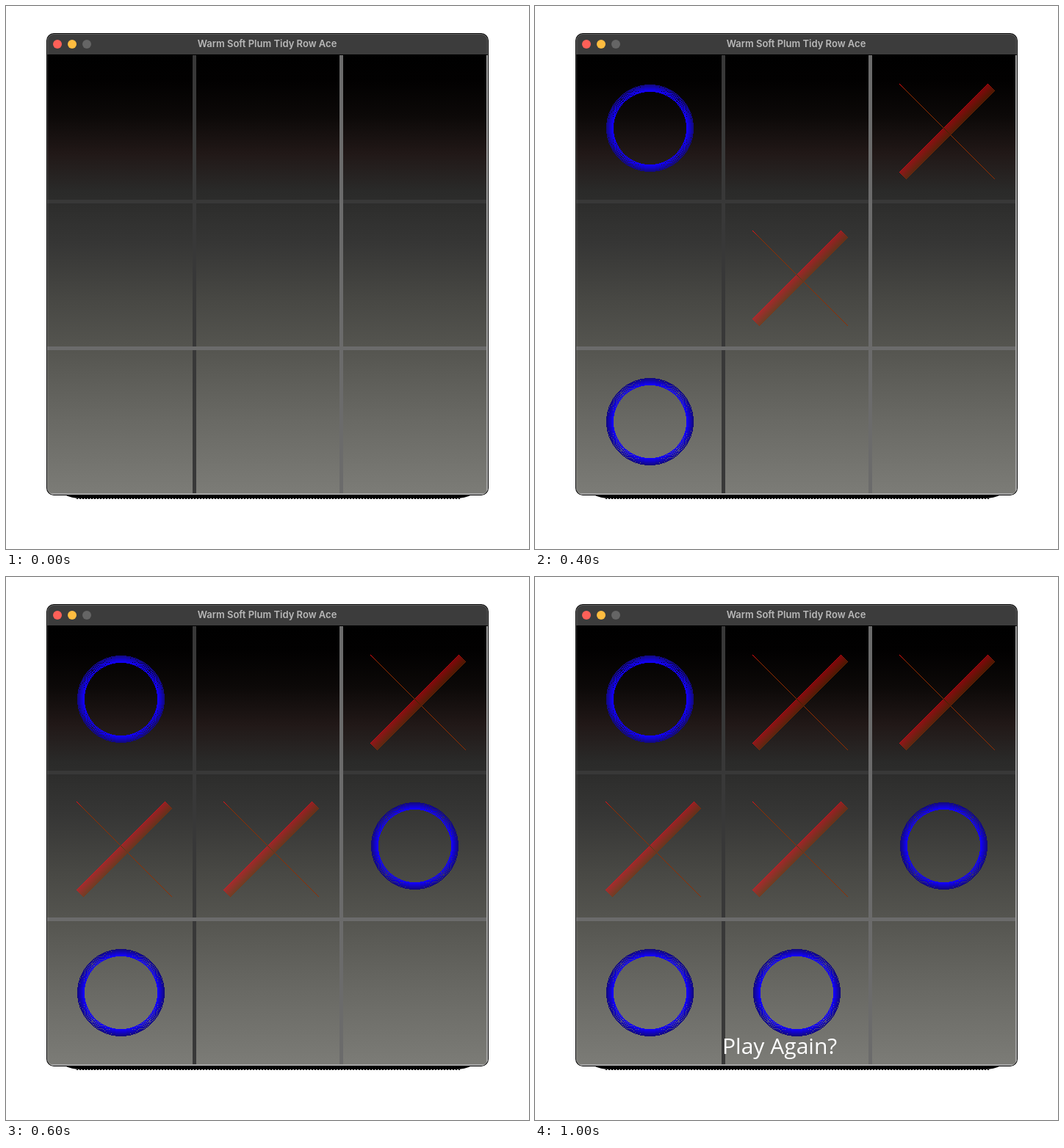
Animation of 712 by 740 pixels, one loop 1.2 s. Source, as an HTML page with a canvas:

```html
<!DOCTYPE html>
<html>
<head>
<meta charset="utf-8">
<style>
html, body { margin: 0; width: 100%; height: 100%; overflow: hidden; background: #fff; }
canvas { display: block; }
</style>
</head>
<body>
<canvas id="stage" width="712" height="740"></canvas>
<script>
const ctx = document.getElementById('stage').getContext('2d');
const LEFT = 56, TOP = 66, CELL = 200, STEP = 200, STEPS = 6;

// [step of appearance, mark, column, row]
const moves = [
  [1, 'O', 0, 0], [1, 'X', 1, 1],
  [2, 'X', 2, 0], [2, 'O', 0, 2],
  [3, 'X', 0, 1], [3, 'O', 2, 1],
  [4, 'X', 1, 0], [4, 'O', 1, 2]
];

const sky = ctx.createLinearGradient(0, TOP, 0, TOP + 600);
[[0, '#000'], [.06, '#020101'], [.14, '#0c0908'], [.225, '#211817'], [.31, '#2a2a29'],
 [.43, '#363635'], [.56, '#484844'], [.67, '#555550'], [.83, '#696964'], [1, '#7c7c77']]
  .forEach(([at, color]) => sky.addColorStop(at, color));

function roundRect(x, y, w, h, r) {
  ctx.beginPath();
  ctx.roundRect(x, y, w, h, r);
}

function line(x1, y1, x2, y2, color, width) {
  ctx.strokeStyle = color;
  ctx.lineWidth = width;
  ctx.beginPath();
  ctx.moveTo(x1, y1);
  ctx.lineTo(x2, y2);
  ctx.stroke();
}

function dot(x, y) {
  ctx.fillRect(x, y, 1, 1);
}

function text(str, x, y, font, color, align) {
  ctx.font = font;
  ctx.fillStyle = color;
  ctx.textAlign = align;
  ctx.fillText(str, x, y);
}

function drawWindow() {
  ctx.fillStyle = '#000';
  ctx.beginPath();
  ctx.moveTo(80, 666);
  ctx.quadraticCurveTo(88, 671, 104, 671);
  ctx.lineTo(610, 671);
  ctx.quadraticCurveTo(626, 671, 634, 666);
  ctx.fill();
  ctx.setLineDash([2, 2]);
  line(96, 671.5, 618, 671.5, '#000', 1);
  ctx.setLineDash([]);

  roundRect(55, 37, 602, 630, 10);
  ctx.fill();

  ctx.save();
  roundRect(LEFT, 38, 600, 628, 9);
  ctx.clip();
  ctx.fillStyle = '#3c3c3c';
  ctx.fillRect(LEFT, 38, 600, 28);
  ctx.fillStyle = sky;
  ctx.fillRect(LEFT, TOP, 600, 600);
  ['#383838', '#6b6b6b', '#9e9e9e'].forEach((color, i) => {
    const d = (i + 1) * CELL + .5;
    line(LEFT + d, TOP + 1, LEFT + d, TOP + 600, color, 5);
    line(LEFT, TOP + d, LEFT + 600, TOP + d, color, 5);
  });
  ctx.fillStyle = '#000';
  ctx.fillRect(LEFT, TOP, 600, 1);
  ctx.restore();

  roundRect(56.5, 38.5, 599, 627, 8.5);
  ctx.strokeStyle = 'rgba(255,255,255,.2)';
  ctx.lineWidth = 1;
  ctx.stroke();

  ['#fe6058', '#febc40', '#656565'].forEach((color, i) => {
    ctx.fillStyle = color;
    ctx.beginPath();
    ctx.arc(70 + 20 * i, 52, 6, 0, 2 * Math.PI);
    ctx.fill();
  });
  text('Warm Soft Plum Tidy Row Ace', 355.5, 56, '600 13px Inter, sans-serif', '#b9b9b9', 'center');
}

// Hard-edged one-pixel circles; the gaps between them let the board show through.
function drawO(x, y) {
  const cx = x + 100, cy = y + 100;
  for (let r = 50; r < 60; r++) {
    ctx.fillStyle = `rgb(18,${r - 50},${255 - 14 * (r - 50)})`;
    for (let a = 0; a <= r * Math.SQRT1_2; a++) {
      const b = Math.round(Math.sqrt(r * r - a * a));
      for (const [dx, dy] of [[a, b], [b, a]]) {
        dot(cx + dx, cy + dy);
        dot(cx - dx, cy + dy);
        dot(cx + dx, cy - dy);
        dot(cx - dx, cy - dy);
      }
    }
  }
}

// Ten crosses, each one pixel further down and right, without smoothing.
function drawX(x, y) {
  for (let i = 0; i < 10; i++) {
    const a = 40 + i;
    ctx.fillStyle = `rgb(${255 - 12 * i},${10 + 4 * i},${18 - 2 * i})`;
    for (let k = 0; k <= 120; k++) {
      dot(x + a + k, y + a + k);
      dot(x + a + 120 - k, y + a + k);
    }
  }
}

function draw(step) {
  ctx.fillStyle = '#fff';
  ctx.fillRect(0, 0, 712, 740);
  drawWindow();
  for (const [at, mark, col, row] of moves) {
    if (at <= step) (mark === 'O' ? drawO : drawX)(LEFT + col * CELL, TOP + row * CELL);
  }
  if (step === 5) {
    text('Play Again?', 255, 650, '30px "Comic Sans MS", "Open Sans", sans-serif', '#fff', 'left');
  }
}

const start = performance.now();
let shown = -1;
function tick() {
  const step = Math.floor((performance.now() - start) / STEP) % STEPS;
  if (step !== shown) draw(shown = step);
  requestAnimationFrame(tick);
}
tick();
</script>
</body>
</html>
```
